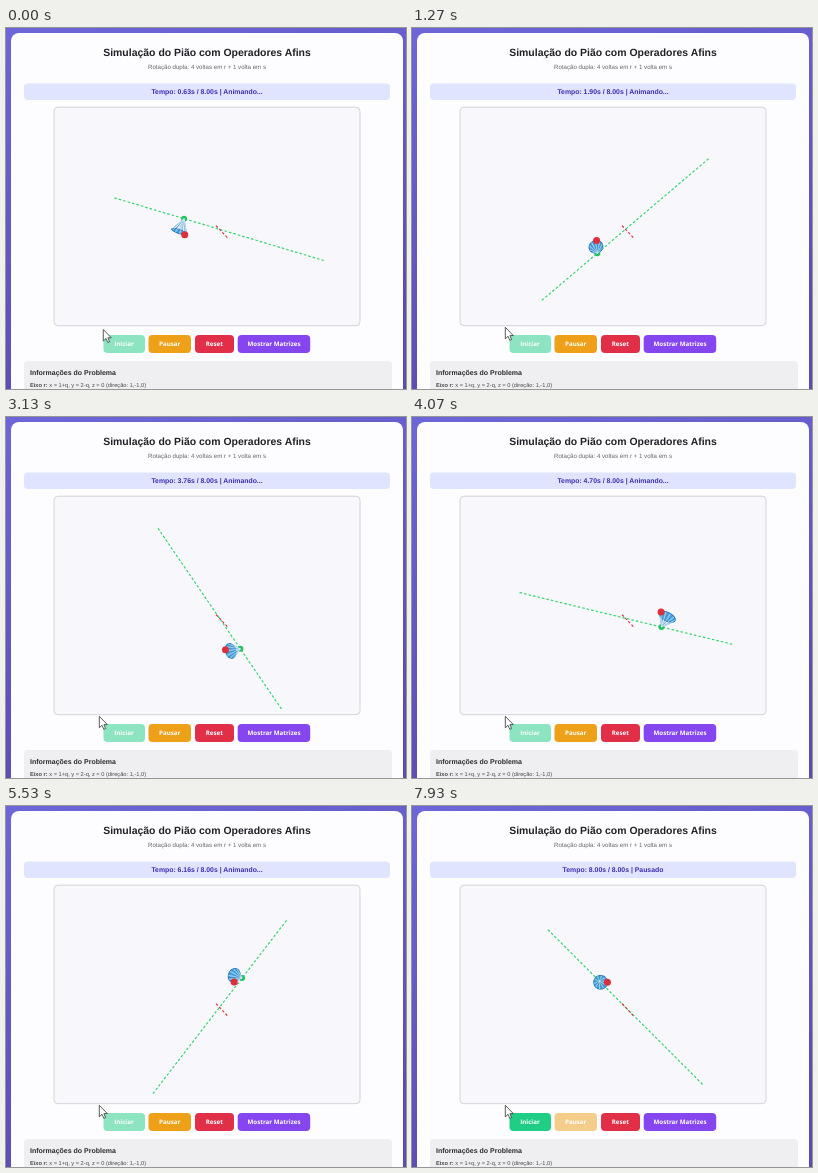
An HTML page for the animation above (8 s loop, 400 px wide and 361 px high).

```html
<!DOCTYPE html>
<html lang="pt">
<head>
<meta charset="utf-8">
<style>
  html, body { margin: 0; width: 100%; height: 100%; overflow: hidden; }
  svg { display: block; width: 100vw; height: 100vh; }
  text { font-family: "Liberation Sans", Arial, sans-serif; text-rendering: geometricPrecision; }
  .bold { font-weight: 700; }
  .mid { text-anchor: middle; }
  .button text { font: 700 6.2px "Open Sans", sans-serif; fill: #fff; text-anchor: middle; }
</style>
</head>
<body>
<svg viewBox="0 0 400 361">
  <defs>
    <linearGradient id="page" x1="0" y1="0" x2=".3" y2="1">
      <stop stop-color="#6c66d8"/><stop offset="1" stop-color="#5d4bb2"/>
    </linearGradient>
    <clipPath id="view"><rect x="48.5" y="79.5" width="305" height="218" rx="4"/></clipPath>
  </defs>
  <rect width="400" height="361" fill="url(#page)"/>
  <rect x="5" y="5" width="392" height="380" rx="8" fill="#fdfcff"/>
  <text class="bold mid" x="201" y="28.3" font-size="10.46" fill="#222226">Simulação do Pião com Operadores Afins</text>
  <text class="mid" x="201" y="41" font-size="6.13" fill="#66666c">Rotação dupla: 4 voltas em r + 1 volta em s</text>
  <rect x="18" y="55.5" width="366" height="16.5" rx="4" fill="#e0e5ff"/>
  <text id="status" class="bold mid" x="201" y="66.3" font-size="6.88" fill="#3a2fae"></text>
  <rect x="48" y="79.2" width="306" height="218.5" rx="4" fill="#f8f7fb" stroke="#d5d3da"/>

  <g clip-path="url(#view)" stroke-linejoin="round">
    <path id="axisR" stroke="#35d673" stroke-width="1.2" stroke-dasharray="2.6 2"/>
    <path id="axisS" stroke="#d9363e" stroke-width="1.2" stroke-dasharray="2.6 2"/>
    <circle id="tip" r="3" fill="#22c55e"/>
    <path id="base" fill="#3d9fdc" fill-opacity=".6" stroke="#2274b5" stroke-width="1.1"/>
    <path id="side" fill="#3d9fdc" fill-opacity=".6"/>
    <path id="ribs" fill="none" stroke="#2274b5" stroke-width=".7" stroke-opacity=".75"/>
    <path id="shine" fill="none" stroke="#d8efff" stroke-width=".7" stroke-opacity=".75"/>
    <circle id="marker" r="3.5" fill="#dc2f3b"/>
  </g>

  <g class="button" id="start"><rect x="97.5" y="307" width="41.5" height="18" rx="4" fill="#20cd84"/><text x="118" y="318.3">Iniciar</text></g>
  <g class="button" id="pause"><rect x="142.5" y="307" width="42.5" height="18" rx="4" fill="#eea018"/><text x="163.7" y="318.3">Pausar</text></g>
  <g class="button"><rect x="189" y="307" width="39" height="18" rx="4" fill="#e22f48"/><text x="208.3" y="318.3">Reset</text></g>
  <g class="button"><rect x="231.7" y="307" width="72.5" height="18" rx="4" fill="#8546ef"/><text x="268" y="318.3">Mostrar Matrizes</text></g>

  <rect x="18" y="333" width="368" height="40" rx="4" fill="#efeef1"/>
  <text class="bold" x="24" y="346.8" font-size="7" fill="#2b2b30">Informações do Problema</text>
  <text x="24" y="359" font-size="5.68" fill="#4a4a50"><tspan class="bold">Eixo r:</tspan> x = 1+q, y = 2-q, z = 0 (direção: 1,-1,0)</text>
  <path id="cursor" d="M0 0V11.5L2.7 9 4.5 13 6.3 12.2 4.6 8.3H8Z" fill="#fff" stroke="#333" stroke-width=".8"/>
</svg>
<script>
const LOOP = 8000, START = 0.63, END = 8;
const CENTER = [201, 188], PIVOT = [12.5, 13.3], DEPTH = 138;
const ARM = 37, HEIGHT = 14, RADIUS = 7.5, HALF_R = 109.8, HALF_S = 53, RIBS = 20;
const $ = id => document.getElementById(id);
const set = (id, attrs) => { for (const k in attrs) $(id).setAttribute(k, attrs[k]); };

// z grows away from the viewer
function project([x, y, z]) {
  const s = DEPTH / (DEPTH + z);
  return [CENTER[0] + x * s, CENTER[1] + y * s];
}
const path = points => 'M' + points.map(p => p.map(v => v.toFixed(2)).join(' ')).join('L');

function drawTop(seconds) {
  const turn = seconds / END * 2 * Math.PI;
  const phi = Math.PI / 4 - turn, theta = 4 * turn;
  const ex = Math.cos(phi), ey = Math.sin(phi);
  const sin = Math.sin(theta), cos = Math.cos(theta);
  // u runs along axis r, v across it, w along the axis of the top
  const place = (u, v, w) => {
    const n = v * cos + w * sin;
    return project([PIVOT[0] + u * ex - n * ey, PIVOT[1] + u * ey + n * ex, w * cos - v * sin]);
  };
  const rim = a => place(-ARM + RADIUS * Math.cos(a), RADIUS * Math.sin(a), HEIGHT);

  const tip = place(-ARM, 0, 0);
  const mark = rim(-Math.PI / 4);
  const ring = Array.from({ length: RIBS }, (_, i) => rim(i / RIBS * 2 * Math.PI));
  const rays = odd => ring.filter((_, i) => i % 2 === odd).map(p => path([tip, p])).join('');

  set('axisR', { d: path([place(-HALF_R, 0, 0), place(HALF_R, 0, 0)]) });
  set('axisS', { d: path([project([...PIVOT, HALF_S]), project([...PIVOT, -HALF_S])]) });
  set('tip', { cx: tip[0], cy: tip[1] });
  set('base', { d: path(ring) + 'Z' });
  set('side', { d: ring.map((p, i) => path([tip, p, ring[(i + 1) % RIBS]]) + 'Z').join('') });
  set('ribs', { d: rays(0) });
  set('shine', { d: rays(1) });
  set('marker', { cx: mark[0], cy: mark[1] });
}

function render(now) {
  const t = Math.floor((now % LOOP + 4) * 0.015) / 15;
  const seconds = Math.min(END, START + t), done = seconds >= END;
  drawTop(seconds);
  $('status').textContent = `Tempo: ${seconds.toFixed(2)}s / 8.00s | ${done ? 'Pausado' : 'Animando...'}`;
  set('start', { opacity: done ? 1 : 0.5 });
  set('pause', { opacity: done ? 0.5 : 1 });
  const rest = Math.max(0, 1 - t / 0.3) ** 2;
  set('cursor', { transform: `translate(${93.3 + 4 * rest} ${299.3 + 2.2 * rest})` });
  requestAnimationFrame(render);
}
render(performance.now());
</script>
</body>
</html>
```
